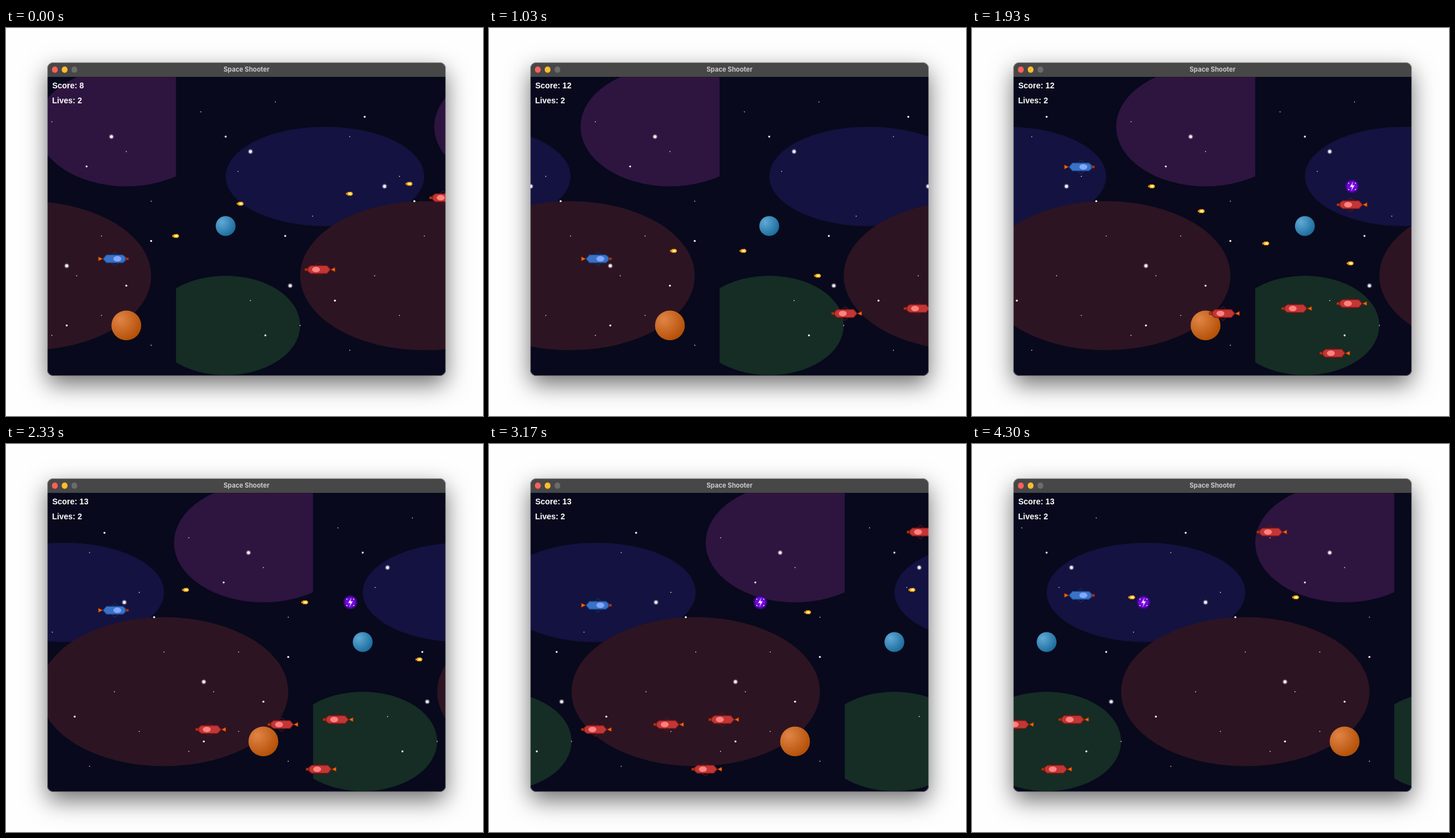
Animation, 830 px wide and 675 px high, one loop 4.33 s. Source, as an HTML page with a canvas:

```html
<!DOCTYPE html>
<html lang="en">
<head>
<meta charset="utf-8">
<title>Space Shooter</title>
<style>
html, body { margin: 0; width: 100%; height: 100%; overflow: hidden; background: #fefefe; }
.win {
  position: absolute; left: 72px; top: 60px; width: 693px; height: 544.5px;
  border-radius: 10px; overflow: hidden; background: #474747;
  box-shadow: 0 15px 40px rgba(0, 0, 0, .56), 0 0 1px rgba(0, 0, 0, .6);
}
.win::after {
  content: ""; position: absolute; inset: 0; border-radius: 10px;
  box-shadow: inset 0 0 0 1px rgba(255, 255, 255, .27);
}
.title {
  position: absolute; left: 0; right: 0; top: 0; text-align: center;
  font: 700 11.2px/25px Inter, sans-serif; color: #c9c9c9;
}
.dot { position: absolute; top: 7.3px; width: 10.4px; height: 10.4px; border-radius: 50%; }
canvas { position: absolute; left: 0; top: 25px; }
</style>
</head>
<body>
<div class="win">
  <div class="title">Space Shooter</div>
  <i class="dot" style="left:7.6px;background:#ff5f57"></i>
  <i class="dot" style="left:24.9px;background:#febc2e"></i>
  <i class="dot" style="left:42.1px;background:#6b6b6b"></i>
  <canvas width="693" height="520"></canvas>
</div>
<script>
const ctx = document.querySelector('canvas').getContext('2d');
const LOOP = 4330, W = 800, H = 600, SCALE = 0.8642;
const ENEMY_SPEED = 4, SHOT_SPEED = 10, PLAYER_SPEED = 5;

// x, y, rx, ry, colour
const nebulae = [
  [700, 100, 180, 120, '#2d1540'],
  [300, 200, 200, 100, '#141240'],
  [500, 400, 250, 150, '#2d1422'],
  [100, 500, 150, 100, '#152d24']
];
// small stars sit in two rows at regular x, given here by height
const upperRow = [70, 190, 50, 280, 120, 400, 200, 320, 90, 400, 320, 150, 250];
const lowerRow = [450, 500, 550, 480, 520, 480, 540];
const smallStars = [
  ...upperRow.map((y, i) => [Math.min(50 + 75 * i, 150 + 50 * i), y]),
  ...lowerRow.map((y, i) => [150 + 100 * i, y])
];
const midStars = [
  [100, 120], [220, 320], [380, 80], [480, 250], [620, 180],
  [750, 330], [180, 520], [320, 450], [580, 500], [700, 420]
];
const bigStars = [[670, 120], [150, 150], [420, 220], [580, 380], [230, 420]];

// player steering: first tick, last tick, direction
const moves = [
  [-55, -51, 1], [-40, -36, 1], [-23, 6, 1], [22, 32, -1],
  [57, 62, 1], [71, 109, -1], [124, 135, 1], [185, 191, -1]
];
const playerY = tick => moves.reduce(
  (y, [a, b, dir]) => y + PLAYER_SPEED * dir * Math.min(Math.max(tick - a, 0), b - a), 211);

// x is the position at tick 0
const enemies = [
  [799, 243], [548, 387.6], [915, 255], [940, 325], [880, 476], [1025.5, 466],
  [1136.5, 456], [1102.3, 556], [1137, 257], [1535.6, 78.5]
].map(([x, y]) => ({ x, y, end: Infinity }));

const shots = [-57, -45, -23, -10, 1, 19, 34, 48, 62, 79, 92, 102, 126, 147, 213, 246]
  .map(start => ({ start, x: 157 - SHOT_SPEED * start, y: playerY(start) + 4, end: Infinity }));

// Shots and enemies close in at constant speed, so every hit is known in advance.
const hits = shots
  .flatMap(shot => enemies.map(foe => ({
    shot, foe, tick: Math.ceil((foe.x - shot.x - 37) / (ENEMY_SPEED + SHOT_SPEED))
  })))
  .filter(({ shot, foe, tick }) => tick > Math.max(0, shot.start) &&
    Math.abs(shot.y - foe.y) < 30 && shot.x + SHOT_SPEED * tick < W)
  .sort((a, b) => a.tick - b.tick)
  .filter(({ shot, foe, tick }) => {
    const live = shot.end === Infinity && foe.end === Infinity;
    if (live) shot.end = foe.end = tick;
    return live;
  });

const blueShip = { body: '#3a72c8', line: '#16427f', glass: '#82a8ff', fin: '#16335f' };
const redShip = { body: '#c23636', line: '#7d1613', glass: '#ff8282', fin: '#5c1518' };

function oval(x, y, rx, ry, fill) {
  ctx.beginPath();
  ctx.ellipse(x, y, rx, ry, 0, 0, Math.PI * 2);
  ctx.fillStyle = fill;
  ctx.fill();
}

function poly(points, fill, line, width = 1.6) {
  ctx.beginPath();
  for (let i = 0; i < points.length; i += 2) ctx.lineTo(points[i], points[i + 1]);
  ctx.closePath();
  if (fill) { ctx.fillStyle = fill; ctx.fill(); }
  if (line) { ctx.strokeStyle = line; ctx.lineWidth = width; ctx.stroke(); }
}

function at(x, y, draw, flip = 1) {
  ctx.save();
  ctx.translate(x, y);
  ctx.scale(flip, 1);
  draw();
  ctx.restore();
}

function planet(x, y, r, light, dark) {
  const hx = x - r * .4, hy = y - r * .4;
  const g = ctx.createRadialGradient(hx, hy, 0, hx, hy, r * 1.5);
  g.addColorStop(0, light);
  g.addColorStop(1, dark);
  oval(x, y, r, r, g);
}

function backdrop(x) {
  ctx.save();
  ctx.translate(x, 0);
  ctx.beginPath();
  ctx.rect(0, 0, W, H);
  ctx.clip();
  for (const n of nebulae) oval(...n);
  for (const [sx, sy] of smallStars) oval(sx, sy, 1, 1, 'rgba(255,255,255,.85)');
  for (const [sx, sy] of midStars) oval(sx, sy, 2, 2, '#f4f2f6');
  for (const [sx, sy] of bigStars) {
    oval(sx, sy, 5, 5, 'rgba(255,255,255,.32)');
    oval(sx, sy, 3, 3, '#f6f0fa');
  }
  planet(700, 500, 30, '#e08446', '#b45006');
  planet(100, 300, 20, '#60a9d5', '#1c6c9d');
  ctx.restore();
}

function ship(c) {
  for (const s of [-1, 1]) poly([-4, 8 * s, 3, 14 * s, 10, 8 * s], null, c.fin, 1.2);
  poly([-30, -4, -22, 0, -30, 4], '#ff6a00', '#b03404', 1);
  poly([24, -2.3, 30.5, -2.3, 30.5, 2.3, 24, 2.3], '#b8360a', '#7d1f08', 1);
  poly([-21, 0, -14, -8, 19, -8, 24.5, -3.5, 24.5, 3.5, 19, 8, -14, 8], c.body, c.line);
  oval(8, 0, 8, 5.5, c.glass);
}

function bullet() {
  poly([-6.5, -2.4, -2.5, 0, -6.5, 2.4], '#ff9d10');
  poly([-3.5, -3, 4, -3.5, 6.5, -1.5, 6.5, 1.5, 4, 3.5, -3.5, 3], '#ffc822', '#f09a10', 1);
  oval(1.5, 0, 2.6, 1.8, '#fff6d0');
}

function powerUp() {
  oval(0, 0, 14, 14, '#35087a');
  oval(0, 0, 11, 11, '#7008d8');
  for (const x of [-7, 7])
    for (const y of [-6.5, 6.5]) oval(x, y, 1.3, 1.3, '#e8c8ff');
  poly([2, -9, -4.5, 1.5, 0, 1.5, -1.5, 9, 5, -2, .5, -2], '#fff', '#b050ff', 1);
}

function draw(t) {
  const rest = t % 100;
  const step = Math.floor(t / 100) * 3 + (rest >= 70 ? 2 : rest >= 30 ? 1 : 0);
  const tick = Math.floor(1.971 * step + .15);

  ctx.setTransform(1, 0, 0, 1, 0, 0);
  ctx.fillStyle = '#08091c';
  ctx.fillRect(0, 0, 693, 520);
  ctx.setTransform(SCALE, 0, 0, SCALE, .8, .3);

  const scroll = (258 + 2 * tick) % W;
  backdrop(scroll);
  backdrop(scroll - W);

  for (const s of shots)
    if (tick > s.start && tick < s.end) at(s.x + SHOT_SPEED * tick, s.y, bullet);
  at(132, playerY(tick), () => ship(blueShip));
  for (const e of enemies)
    if (tick < e.end) at(e.x - ENEMY_SPEED * tick, e.y, () => ship(redShip), -1);
  at(1023 - 3 * tick, 220, powerUp);

  ctx.setTransform(1, 0, 0, 1, 0, 0);
  ctx.font = 'bold 14px "Liberation Sans", Arial, sans-serif';
  ctx.fillStyle = '#fff';
  ctx.fillText('Score: ' + (8 + hits.filter(h => tick >= h.tick).length), 8.4, 19.6);
  ctx.fillText('Lives: 2', 8.2, 45.6);
}

function loop() {
  draw(performance.now() % LOOP);
  requestAnimationFrame(loop);
}
loop();
</script>
</body>
</html>
```
